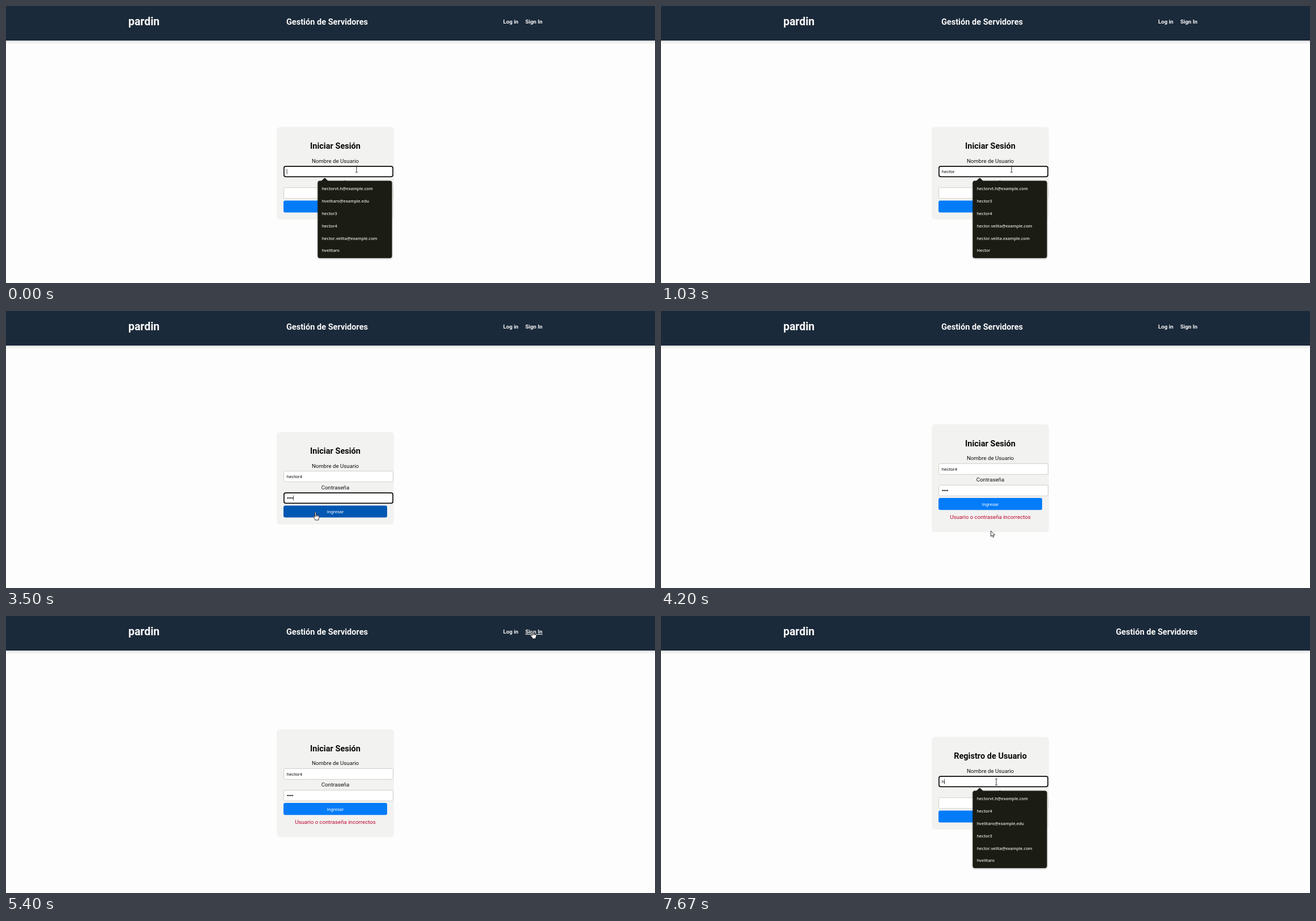
Recreate the animation shown at these times as an HTML page with a canvas. Size 1146 by 489 pixels, loop 8 s.

```html
<!DOCTYPE html>
<html lang="es">
<head>
<meta charset="utf-8">
<title>Gestión de Servidores</title>
<style>
html, body { margin: 0; width: 100%; height: 100%; overflow: hidden; background: #fdfdfd; }
canvas { display: block; width: 1146px; height: 489px; }
</style>
</head>
<body>
<canvas id="stage" width="1146" height="489"></canvas>
<script>
const ctx = document.getElementById('stage').getContext('2d');
const LOOP = 8000, MID = 581.5;
const UI = 'Roboto, sans-serif';
const USER = 'hector4';
const KEY_TIMES = [170, 330, 490, 630, 770, 900, 2000];
const DOT_TIMES = [2600, 2770, 2970, 3030];
const ERROR_AT = 3600, REGISTER_AT = 6000, TYPE_AT = 7670;

const MAIL = 'hectorvt.h@example.com', WORK = 'hector.velita@example.com';
const SCHOOL = 'hvelitaro@example.edu', NICK = 'hvelitaro';
const ALL_USERS = [MAIL, SCHOOL, 'hector3', 'hector4', WORK, NICK];
const MATCHES = [MAIL, 'hector3', 'hector4', WORK, 'hector.velita.example.com', 'Hector'];
const NEW_USERS = [MAIL, 'hector4', SCHOOL, 'hector3', WORK, NICK];

// time, x, y of the pointer hot spot
const PATH = [
  [0, 619, 288], [2960, 619, 288], [2990, 612, 262], [3030, 578, 338],
  [3499, 578, 338], [3500, 546.5, 355], [3800, 546.5, 355], [4190, 582.5, 388],
  [4260, 582.5, 388], [4300, 588, 392], [4730, 930, 118], [4920, 930, 118],
  [5380, 930, 26], [6080, 930, 26], [6520, 608.5, 268], [6560, 608.5, 268],
  [6790, 592, 293], [8000, 592, 293]
];

const clamp = v => Math.max(0, Math.min(1, v));
const ramp = (t, a, b) => { const u = clamp((t - a) / (b - a)); return u * u * (3 - 2 * u); };
const between = (t, a, b) => t >= a && t < b;
const passed = (times, t) => times.filter(at => t >= at).length;
const mix = (a, b, u) => `rgb(${a.map((v, i) => Math.round(v + (b[i] - v) * u))})`;

function text(str, x, y, size, color, weight = 400, align = 'left', family = UI) {
  ctx.font = `${weight} ${size}px ${family}`;
  ctx.textAlign = align;
  ctx.fillStyle = color;
  ctx.fillText(str, x, y);
}

function box(x, y, w, h, r, fill) {
  ctx.beginPath();
  ctx.roundRect(x, y, w, h, r);
  ctx.fillStyle = fill;
  ctx.fill();
}

function frame(x, y, w, h, r, color, width) {
  const d = width / 2;
  ctx.beginPath();
  ctx.roundRect(x + d, y + d, w - width, h - width, r);
  ctx.strokeStyle = color;
  ctx.lineWidth = width;
  ctx.stroke();
}

function shadow(color, blur, dy) {
  ctx.shadowColor = color;
  ctx.shadowBlur = blur;
  ctx.shadowOffsetY = dy;
}

function header(register, underline) {
  ctx.save();
  shadow('rgba(0,0,0,.16)', 5, 2);
  ctx.fillStyle = '#1b2a3a';
  ctx.fillRect(-10, -10, 1166, 71);
  ctx.restore();
  text('pardin', 216, 33.8, 19.4, '#fafafa', 700);
  const title = 'Gestión de Servidores';
  if (register) {
    text(title, 947.3, 32.5, 14.55, '#fafafa', 700, 'right');
    return;
  }
  text(title, 567, 32.5, 14.55, '#fafafa', 700, 'center');
  text('Log in', 878, 31, 9.7, '#fafafa', 700);
  text('Sign In', 917, 31, 9.7, '#fafafa', 700);
  if (underline) ctx.fillRect(917, 32, 30.3, 1);
}

function input(y, focus) {
  box(490, y, 194, 20, 3, '#fff');
  frame(490, y, 194, 20, 2.5, '#cfcfc6', 1);
  if (focus > 0) {
    ctx.globalAlpha = focus;
    frame(490, y, 194, 20, 3, '#0c0c0c', 1.7);
    ctx.globalAlpha = 1;
  }
}

function caret(x, y) {
  ctx.fillStyle = '#222';
  ctx.fillRect(x, y - 4.5, 0.8, 9);
}

function typed(str, y, showCaret) {
  text(str, 495.7, y + 3, 8.08, '#111');
  if (showCaret) caret(495.7 + ctx.measureText(str).width, y);
}

function form(s) {
  ctx.save();
  ctx.translate(0, s.error ? -13.3 : 0);
  box(478, 213.4, 207, s.error ? 190.4 : 163.6, 6, '#f2f2f1');
  text(s.title, MID, 252, 14.55, '#080808', 700, 'center');
  text('Nombre de Usuario', MID, 276.6, 9.7, '#111', 400, 'center');
  input(282.2, s.userFocus);
  typed(s.user, 292.3, s.userCaret);
  text('Contraseña', MID, 314.5, 9.7, '#111', 400, 'center');
  input(320.2, s.passFocus);
  for (let i = 0; i < s.dots; i++) {
    ctx.beginPath();
    ctx.arc(497.4 + i * 2.82, 330.2, 1.15, 0, 7);
    ctx.fillStyle = '#111';
    ctx.fill();
  }
  if (s.passCaret) caret(495.9 + s.dots * 2.82, 330.2);
  box(490, 343.4, 183, 21.2, 3, mix([4, 124, 248], [2, 87, 178], s.hover));
  text(s.button, MID, 356.8, 8.08, '#fff', 400, 'center');
  if (s.error) text('Usuario o contraseña incorrectos', MID, 379.8, 9.7, '#bb0a30', 400, 'center');
  ctx.restore();
}

function popup(rows, alpha) {
  if (alpha <= 0) return;
  ctx.save();
  ctx.globalAlpha = alpha;
  ctx.beginPath();
  ctx.moveTo(556.5, 309);
  ctx.lineTo(562.8, 303.2);
  ctx.lineTo(569, 309);
  ctx.fillStyle = '#1b1c14';
  ctx.fill();
  shadow('rgba(0,0,0,.35)', 3, 1);
  box(550.4, 308.4, 131.2, 136.6, 4, '#1b1c14');
  shadow('transparent', 0, 0);
  rows.forEach((row, i) =>
    text(row, 557.7, 324.7 + i * 21.95, 7.3, '#e4e3d8', 600, 'left', '"Open Sans", "Noto Sans", sans-serif'));
  ctx.restore();
}

function pointerAt(t) {
  const i = PATH.findIndex(p => p[0] > t);
  const [t0, x0, y0] = PATH[i - 1], [t1, x1, y1] = PATH[i];
  const u = ramp(t, t0, t1);
  return [x0 + (x1 - x0) * u, y0 + (y1 - y0) * u];
}

function pointerKind(x, y, register, shift) {
  const inside = (l, top, r, b) => x >= l && x <= r && y >= top && y <= b;
  if (!register && inside(917, 21, 948, 35)) return 'hand';
  if (inside(490, 343 + shift, 673, 365 + shift)) return 'hand';
  if (inside(490, 282 + shift, 684, 302 + shift) || inside(490, 320 + shift, 684, 340 + shift)) return 'beam';
  return 'arrow';
}

const ARROW = new Path2D('M0 0V10L2.3 7.9L3.9 11.5L5.5 10.8L3.9 7.3H7.1Z');
const BEAM = new Path2D('M-2 -5.5H-.6L0 -5L.6 -5.5H2M0 -5V5M-2 5.5H-.6L0 5L.6 5.5H2');
const HAND = new Path2D('M-1 1Q0 -.6 1 1V5L2.6 5.2L4.3 5.7L6 6.5Q6.8 7 6.5 9L5.5 12V14H-.7V12.4L-3.8 8.5Q-4 7 -2.6 7.4L-1 8.8Z');

function pointer(x, y, kind) {
  ctx.save();
  ctx.translate(x, y);
  ctx.lineJoin = 'round';
  ctx.strokeStyle = '#1c1c1c';
  ctx.lineWidth = 0.9;
  if (kind !== 'beam') {
    const shape = kind === 'hand' ? HAND : ARROW;
    ctx.fillStyle = '#fff';
    ctx.fill(shape);
    ctx.stroke(shape);
    if (kind === 'hand') ctx.stroke(new Path2D('M1 5V8M2.8 5.5V8M4.6 6V8'));
  } else {
    ctx.stroke(BEAM);
  }
  ctx.restore();
}

function loginState(t) {
  return {
    title: 'Iniciar Sesión', button: 'Ingresar', error: t >= ERROR_AT,
    user: USER.slice(0, passed(KEY_TIMES, t)),
    userFocus: 1 - ramp(t, 2170, 2330),
    userCaret: t < 1000 || between(t, 2000, 2170),
    passFocus: ramp(t, 2170, 2330) * (1 - ramp(t, 3530, 3600)),
    dots: passed(DOT_TIMES, t),
    passCaret: between(t, 2200, 3530),
    hover: between(t, 3500, ERROR_AT) ? 1
      : t < 4300 ? (t >= ERROR_AT ? 1 - ramp(t, ERROR_AT, 3800) : 0)
      : 0.5 * ramp(t, 4440, 4490) * (1 - ramp(t, 4490, 4700))
  };
}

function registerState(t) {
  return {
    title: 'Registro de Usuario', button: 'Registrarse', error: false,
    user: t >= TYPE_AT ? USER[0] : '',
    userFocus: ramp(t, 6800, 6870),
    userCaret: between(t, 6830, 7470) || t >= TYPE_AT,
    passFocus: 0, dots: 0, passCaret: false, hover: 0
  };
}

function draw(t) {
  const register = t >= REGISTER_AT;
  const state = register ? registerState(t) : loginState(t);
  const [x, y] = pointerAt(t);
  const kind = pointerKind(x, y, register, state.error ? -13.3 : 0);
  ctx.fillStyle = '#fdfdfd';
  ctx.fillRect(0, 0, 1146, 489);
  header(register, kind === 'hand' && y < 61);
  form(state);
  if (register) popup(NEW_USERS, ramp(t, 6850, 7030));
  else popup(t < KEY_TIMES[1] ? ALL_USERS : MATCHES, 1 - ramp(t, 1990, 2030));
  pointer(x, y, kind);
}

const start = performance.now();
function tick() {
  draw((performance.now() - start) % LOOP);
  requestAnimationFrame(tick);
}
tick();
</script>
</body>
</html>
```
